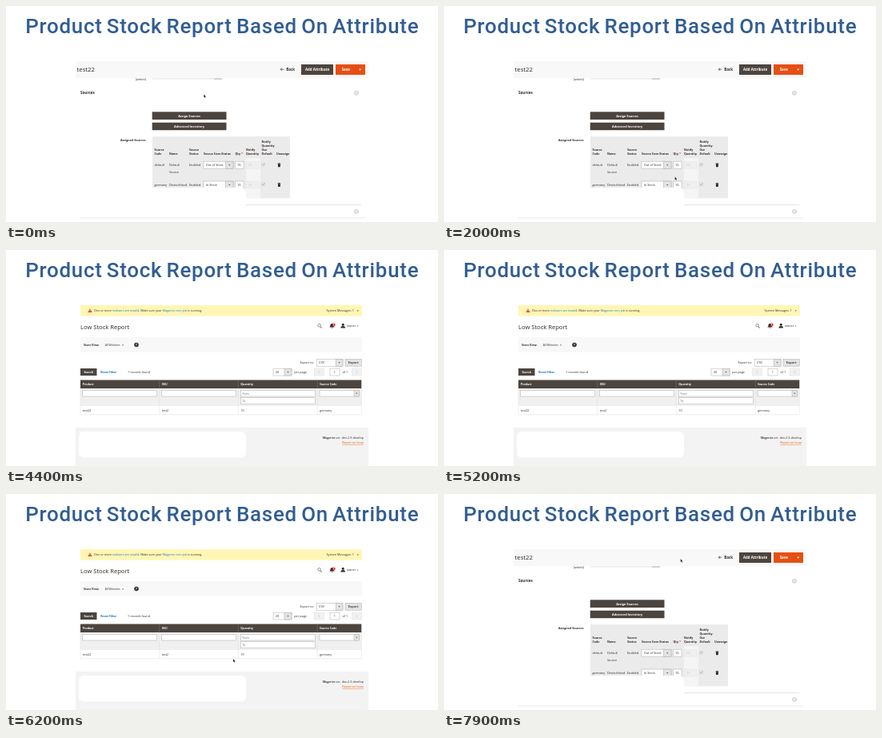
Write an HTML page that moves like this. It is 540x270 px and loops after 8000 ms.

```html
<!DOCTYPE html>
<html lang="en">
<head>
<meta charset="utf-8">
<title>Product Stock Report</title>
<style>
html, body { margin: 0; width: 100%; height: 100%; overflow: hidden; background: #fff; }
svg { display: block; width: 540px; height: 270px; }
text { font-family: "Open Sans", sans-serif; font-size: 3.8px; fill: #302824; white-space: pre; }
.b { font-weight: 700; }
.title { font: 500 25.9px Roboto, sans-serif; letter-spacing: .75px; word-spacing: -2px; fill: #315d92; }
</style>
</head>
<body>
<svg viewBox="0 0 540 270" xmlns="http://www.w3.org/2000/svg">
  <clipPath id="screen"><rect x="87" y="69" width="366" height="201"/></clipPath>
  <text class="title" x="270.3" y="34.1" text-anchor="middle">Product Stock Report Based On Attribute</text>
  <g id="form"></g>
  <g id="report"></g>
  <g clip-path="url(#screen)">
    <path id="arrow" d="M0 0V4.2L1 3.4 1.6 4.7 2.3 4.4 1.7 3.2H2.9Z" fill="#111" stroke="#fff" stroke-width=".25"/>
    <path id="hand" d="M-.7-2.2Q0-2.8.3-2V-.5L2 0V1.4L1.4 2.6H-.6L-1.8.6-1.1.3-.7.8Z" fill="#fff" stroke="#333" stroke-width=".6"/>
  </g>
  <rect x="91" y="227" width="209" height="32.5" rx="6" fill="#fff"/>
</svg>
<script>
const $ = id => document.getElementById(id);
const DARK = '#4c443e', INK = '#302824', GREY = '#adadad', BLUE = '#1979c3';

const rect = (x, y, w, h, fill, stroke = 'none') =>
  `<rect x="${x}" y="${y}" width="${w}" height="${h}" fill="${fill}" stroke="${stroke}" stroke-width=".5"/>`;
const text = (x, y, s, attrs = '') => `<text x="${x}" y="${y}" ${attrs}>${s}</text>`;
const bold = (x, y, s, size = 3.8, fill = INK, anchor = 'start') =>
  text(x, y, s, `class="b" text-anchor="${anchor}" style="font-size:${size}px;fill:${fill}"`);
const line = (d, color = GREY, w = .5) =>
  `<path d="${d}" fill="none" stroke="${color}" stroke-width="${w}"/>`;
const caret = (x, y, fill = '#333', s = 1.1) =>
  `<path d="M${x - s} ${y - s / 2}h${2 * s}l${-s} ${s * 1.2}z" fill="${fill}"/>`;
const dot = (x, y, r, fill, stroke = 'none') =>
  `<circle cx="${x}" cy="${y}" r="${r}" fill="${fill}" stroke="${stroke}" stroke-width=".5"/>`;
const input = (x, y, w, h) => rect(x, y, w, h, '#fff', GREY);
const button = (x, y, w, h, s, size) =>
  rect(x, y, w, h, DARK) + bold(x + w / 2, y + h / 2 + size * .36, s, size, '#fff', 'middle');
const select = (x, y, w, h, s, arrowW) =>
  input(x, y, w, h) + rect(x + w - arrowW, y, arrowW, h, '#e3e3e3', GREY) +
  caret(x + w - arrowW / 2, y + h / 2) + text(x + 2.8, y + h / 2 + 1.4, s);
const toggle = y => dot(438, y, 2.4, '#fff', '#888') + line(`M437 ${y - .4}l1 1 1-1`, '#666');

function stockRow(y, code, name, status) {
  return text(185.5, y + 1.4, code) + text(204, y + 1.4, name) + text(229, y + 1.4, 'Enabled') +
    select(247, y - 4.5, 37, 9, status, 9.5) +
    input(286.5, y - 4.5, 10.5, 9) + text(289, y + 1.4, '10.') +
    rect(300.5, y - 4.5, 16, 9, '#efefef', '#e4e4e4') + text(303, y + 1.4, '20', 'opacity=".2"') +
    rect(319.5, y - 2.5, 4, 4, '#f3f3f3', '#c4c4c4') + line(`M320.4 ${y - .6}l.9 1 1.6-2.2`, '#555') +
    `<path d="M339.8 ${y - 1}h3.2l-.3 3.6h-2.6zM339.5 ${y - 2}h1.2v-.5h1.4v.5h1.2v.7h-3.8z" fill="${INK}"/>`;
}

function formView() {
  const heads = [
    [185.5, 'Source', 'Code'], [204, 'Name'], [229, 'Source', 'Status'], [247, 'Source Item Status'],
    [286.5, 'Qty <tspan fill="#e22626">*</tspan>'], [300, 'Notify', 'Quantity'],
    [319.5, 'Notify', 'Quantity', 'Use', 'Default'], [338, 'Unassign']
  ];
  const head = heads.map(([x, ...rows]) => rows.map((s, i) =>
    bold(x, 186 - (rows.length - 1 - i) * 5.1, s, 3.6)).join('')).join('');
  return rect(87, 69, 366, 21.3, '#f8f8f8') +
    text(88.5, 82, 'test22', 'style="font-size:7.8px"') +
    line('M347.2 79.2h-4M344.8 77.6l-1.6 1.6 1.6 1.6', INK, .7) + bold(350.3, 81, 'Back', 4.5) +
    button(369, 73, 40, 13, 'Add Attribute', 4.4) +
    rect(412, 73, 37, 13, '#e65014') + bold(419.7, 81, 'Save', 4.4, '#fff') +
    line('M437.3 73v13', '#d2450c', .4) + caret(442.7, 79.4, '#fff', 1.5) +
    text(162, 93, '[website]', 'style="font-size:3.1px"') +
    line('M183 91H270', '#c4c4c4') + line('M260 91.1H270', '#a5a5a5', .8) +
    bold(93, 109.8, 'Sources', 4.6) + toggle(108.8) +
    button(182.7, 132.3, 92.8, 9.7, 'Assign Sources', 3.8) +
    button(182.7, 145.7, 92.8, 9.5, 'Advanced Inventory', 3.8) +
    bold(174.5, 169, 'Assigned Sources', 3.7, INK, 'end') +
    rect(183, 163, 172, 77.2, '#ebebeb') + rect(300, 190, 18, 50.2, '#f5f5f5') + head +
    stockRow(198.7, 'default', 'Default', 'Out of Stock') + text(204, 209, 'Source') +
    stockRow(223.5, 'germany', 'Deutschland', 'In Stock') +
    rect(91, 235, 209, 24, '#fff') +
    line('M300 248.6H444', '#c9c9c9') + toggle(257) + line('M92 265H449', '#d6d6d6');
}

function reportView() {
  const white = (x, s) => bold(x, 169.2, s, 3.5, '#fff');
  const link = s => `<tspan fill="${BLUE}">${s}</tspan>`;
  return rect(93, 69, 352, 13.6, '#fff6b5') +
    '<path d="M105 73.2l2.7 4.8h-5.4z" fill="#e1482b"/>' + line('M105 74.8v1.5M105 76.8v.5', '#fff', .6) +
    text(110, 77.4, `One or more ${link('indexers are invalid')}. Make sure your ${link('Magento cron job')} is running.`,
      'style="font-size:3.7px"') +
    text(400.5, 77.4, 'System Messages: 1', 'style="font-size:3.7px"') + caret(439.7, 76) +
    text(93, 98.7, 'Low Stock Report', 'style="font-size:7.6px"') +
    dot(391.6, 94.3, 1.8, 'none', '#333') + line('M392.9 95.7l1.7 1.8', '#333', .9) +
    `<path d="M404.3 96.5q1.2-.8 1.2-2.4 0-2 2-2t2 2q0 1.6 1.2 2.4zM406.7 97h1.6l-.8.9z" fill="${INK}"/>` +
    dot(409.6, 93.6, 2, '#e22626') + bold(409.6, 94.6, '1', 2.6, '#fff', 'middle') +
    dot(421.2, 93.3, 1.5, INK) + `<path d="M418.4 97.4q0-2.3 2.8-2.3t2.8 2.3z" fill="${INK}"/>` +
    text(426, 96.4, 'owner') + caret(439.6, 95.2, '#333', .9) +
    rect(93, 109, 352, 18.8, '#f8f8f8') +
    bold(97, 120, 'Store View:', 3.5) + text(123.7, 120, 'All Websites', 'style="font-size:3.4px"') +
    caret(146, 119, '#333', .9) +
    dot(163, 118.5, 2.8, '#333') + bold(163, 120, '?', 4, '#fff', 'middle') +
    text(367.5, 142.2, 'Export to:') + select(388.3, 136.4, 32.7, 8.8, 'CSV', 8.8) +
    rect(424, 136.4, 20.3, 8.8, '#e3e3e3', GREY) + bold(434.2, 142.2, 'Export', 3.9, DARK, 'middle') +
    button(93, 148, 20.5, 9, 'Search', 3.5) + bold(118.3, 154, 'Reset Filter', 3.5, '#006bb4') +
    text(152, 154, '1 records found') +
    select(334, 148.2, 23, 8.8, '20', 9) + text(360.3, 154, 'per page') +
    [385.5, 432.3].map((x, i) => rect(x, 148.2, 12, 8.8, '#f1f1f1', '#ddd') +
      line(`M${x + 6.4 - i} 151.2l${i ? 1.3 : -1.3} 1.5 ${i ? -1.3 : 1.3} 1.5`, '#aaa')).join('') +
    input(405, 148.2, 12, 8.8) + text(409.8, 154, '1') + text(420.5, 154, 'of 1') +
    rect(93, 162.5, 351.3, 10.5, DARK) +
    line('M191.7 162.5v10.5M290.3 162.5v10.5M389.3 162.5v10.5', '#8a837f', .4) +
    white(95.8, 'Product') + white(194.7, 'SKU') + white(293.3, 'Quantity') + white(392, 'Source Code') +
    rect(93, 173, 351.3, 22, '#f0f0f0') +
    input(95.7, 175.5, 93, 7.5) + input(194.5, 175.5, 93, 7.5) +
    input(293.3, 175.5, 93, 7.5) + input(293.3, 184.7, 93, 7.5) +
    text(295.5, 180.6, 'From', 'style="font-size:3.4px" opacity=".75"') +
    text(295.5, 189.8, 'To', 'style="font-size:3.4px" opacity=".75"') +
    select(392, 175.5, 49.5, 7.5, '', 6.5) +
    line('M93 173V205.8M191.7 173V205.8M290.3 173V205.8M389.3 173V205.8M444.3 173V205.8M93 205.8H444.3', '#d6d6d6', .4) +
    [[95.8, 'test22'], [194.7, 'test2'], [293.3, '10'], [392, 'germany']].map(([x, s]) =>
      text(x, 201.6, s, 'style="font-size:3.7px"')).join('') +
    rect(87, 222, 366, 48, '#f3f3f3') +
    text(447, 236, '<tspan font-weight="600">Magento</tspan> ver. dev-2.3-develop',
      'text-anchor="end" style="font-size:3.7px"') +
    text(447, 242.4, 'Report an Issue',
      'text-anchor="end" style="font-size:3.7px;fill:#eb5202;text-decoration:underline"');
}

$('form').innerHTML = formView();
$('report').innerHTML = reportView();

// Pointer stops: time, x, y
const stops = [
  [0, 247.3, 110.3], [200, 247.5, 111], [400, 248, 115], [1200, 251, 196], [1400, 255, 200],
  [2000, 288.6, 213.3], [2300, 286, 217], [3200, 273.4, 223.8], [3600, 273, 230], [5200, 277, 231],
  [5800, 280.5, 198.8], [6200, 284, 206], [6900, 284, 206], [7400, 292, 64], [7700, 296, 64],
  [7900, 295.7, 81], [8000, 293, 85]
];

function pointer(t) {
  const i = stops.findIndex(s => s[0] > t);
  const [t0, x0, y0] = stops[i - 1], [t1, x1, y1] = stops[i];
  const p = (t - t0) / (t1 - t0), e = p * p * (3 - 2 * p);
  return [x0 + (x1 - x0) * e, y0 + (y1 - y0) * e];
}

const show = (el, on) => el.style.display = on ? '' : 'none';

function draw(ms) {
  const t = Math.floor(ms % 8000 / 100) * 100;
  const report = t >= 4400 && t < 7500;
  const [x, y] = pointer(t);
  const overRow = report && y > 173 && y < 205;
  show($('form'), !report);
  show($('report'), report);
  show($('hand'), overRow);
  show($('arrow'), !overRow);
  $(overRow ? 'hand' : 'arrow').setAttribute('transform', `translate(${x} ${y})`);
}

const start = performance.now();
function tick() {
  draw(performance.now() - start);
  requestAnimationFrame(tick);
}
tick();
</script>
</body>
</html>
```
